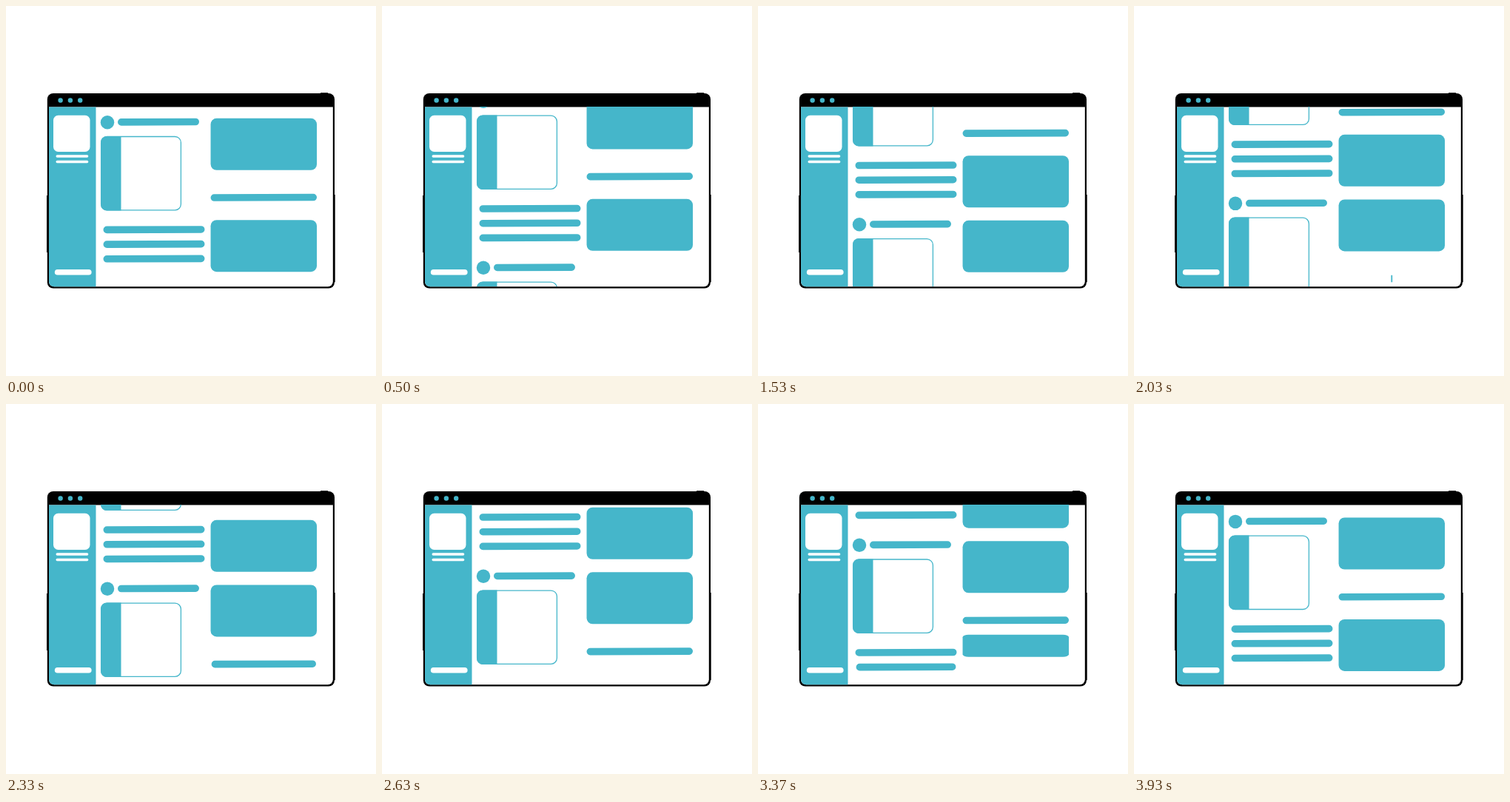
An HTML page with a canvas for the animation above (3960 ms loop, 500 by 500 pixels).

```html
<!DOCTYPE html>
<html lang="en">
<head>
<meta charset="utf-8">
<title>Scrolling page</title>
<style>
  html, body { margin: 0; width: 100%; height: 100%; overflow: hidden; background: #fff; }
  canvas { display: block; width: 500px; height: 500px; }
</style>
</head>
<body>
<canvas id="stage" width="500" height="500"></canvas>
<script>
const ctx = document.getElementById('stage').getContext('2d');
const TEAL = '#45b6ca', LOOP = 3960, PAGE = 225;
const GROW = PAGE * 400 / LOOP; // scroll distance over which a part grows in
const TILT = -.0035;            // hand-drawn slant of the bars
const RIGHT = 348.3, WIDE = 143.5;

function round(x, y, w, h, r, color) {
  ctx.fillStyle = color;
  ctx.beginPath();
  ctx.roundRect(x, y, w, h, r);
  ctx.fill();
}

function centred(x, y, w, h, r, sx, sy, tilt = 0) {
  ctx.save();
  ctx.translate(x, y);
  ctx.rotate(tilt);
  ctx.scale(sx, sy);
  round(-w / 2, -h / 2, w, h, r, TEAL);
  ctx.restore();
}

// share of the growth still to come once a part has risen past the entry height
const rest = (y, entry) => 1 - Math.min(1, Math.max(0, (entry - y) / GROW));

function bar(x, y, w, entry) {
  const s = 1 - rest(y, entry) ** 3;
  if (s) centred(x, y, w, 9.6, 4.8, s, 1, TILT);
}

function dot(x, y, d, entry) {
  const s = 1 - rest(y, entry) ** 3;
  if (s) centred(x, y, d, d, d / 2, s, s);
}

function box(y, entry) {
  const left = rest(y, entry);
  if (left < 1) centred(RIGHT, y - 78 * left ** 5, WIDE, 70, 8, 1, 1 - left ** 3);
}

function card(y) {
  round(128, y, 27.5, 100.5, [8, 0, 0, 8], TEAL);
  ctx.strokeStyle = TEAL;
  ctx.lineWidth = 1.3;
  ctx.beginPath();
  ctx.roundRect(128.6, y + .6, 107.8, 99.3, 8);
  ctx.stroke();
}

function page(top) {
  dot(137, top + 157, 18.5, 378);
  bar(206, top + 156.5, 110, 378);
  card(top + 175.7);
  for (let i = 0; i < 3; i++) bar(200, top + 302 + 19.7 * i, 137, 372.2);
  box(top + 186.6, 362.2);
  bar(RIGHT, top + 258.6, WIDE, 368.3);
  box(top + 324, 361.3);
}

function browser() {
  round(55.8, 118, 388.2, 263.6, 8, '#000');
  ctx.fillRect(55, 256, 2, 77);
  ctx.fillRect(443, 255, 1.7, 118);
  ctx.fillRect(425, 117.2, 10, 2);
  round(58, 136.4, 383.8, 242.8, [0, 0, 7, 7], '#fff');
  for (let i = 0; i < 3; i++) dot(73.6 + 13.3 * i, 127.5, 6.4, 500);

  round(58, 136.4, 63.5, 242.8, [0, 0, 0, 7], TEAL);
  round(64, 147.8, 49.5, 49.2, 6.5, '#fff');
  for (let i = 0; i < 2; i++) round(67.5, 201.2 + 7.6 * i, 43.8, 3.5, 1.7, '#fff');
  round(65.8, 356, 49.8, 7.6, 3.8, '#fff');
}

function draw(now) {
  const scroll = PAGE * (now % LOOP) / LOOP;
  ctx.fillStyle = '#fff';
  ctx.fillRect(0, 0, 500, 500);
  browser();
  ctx.save();
  ctx.beginPath();
  ctx.rect(122, 136, 319, 243);
  ctx.clip();
  ctx.translate(0, .25);
  page(-scroll);
  page(PAGE - scroll);
  ctx.restore();
}

const begin = performance.now();
function tick() {
  draw(performance.now() - begin);
  requestAnimationFrame(tick);
}
tick();
</script>
</body>
</html>
```
